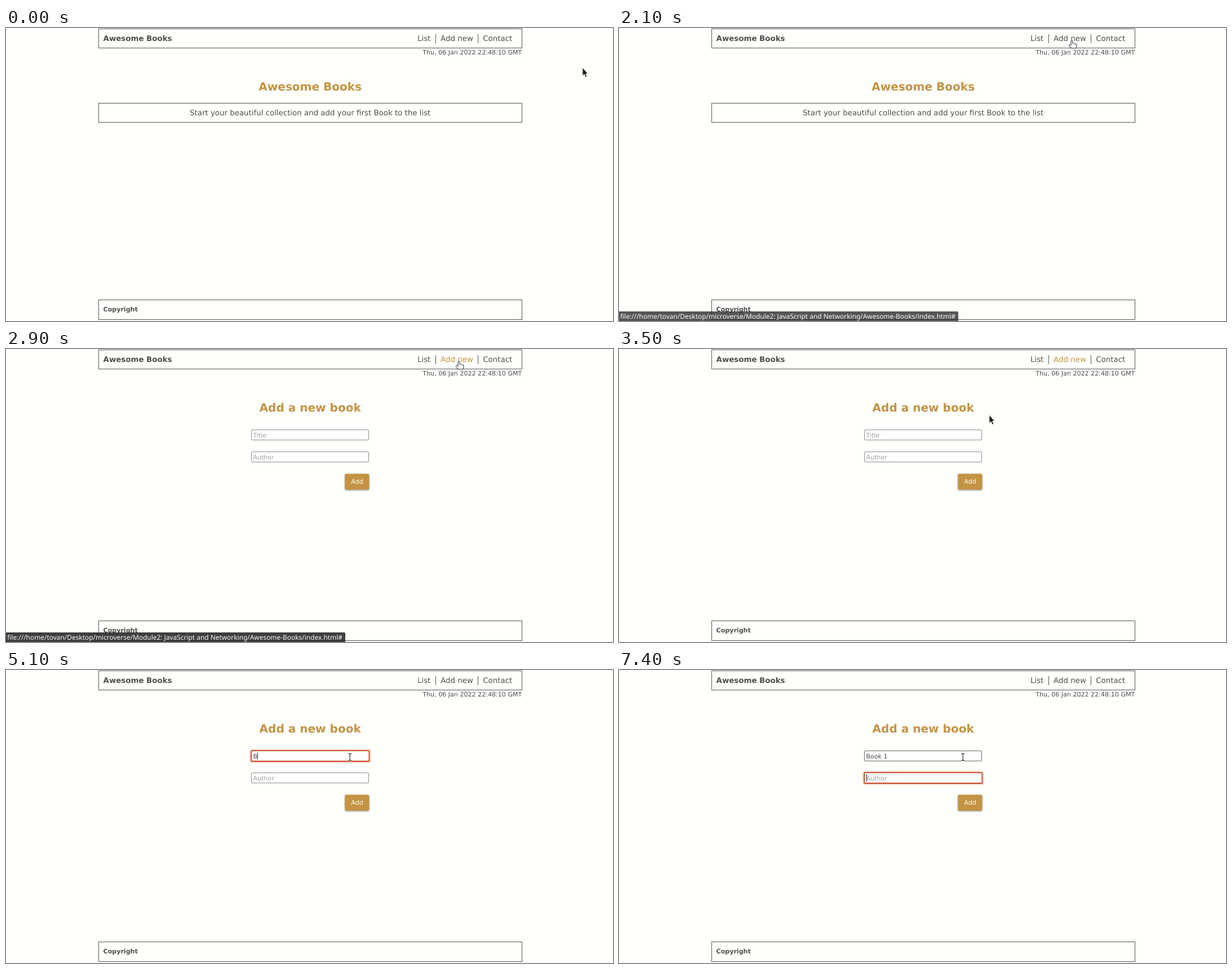
Animation of 1077x520 px, one loop 8 s. Source, as an HTML page:

```html
<!DOCTYPE html>
<html lang="en">
<head>
<meta charset="utf-8">
<title>Awesome Books</title>
<style>
  html, body { margin: 0; width: 100%; height: 100%; overflow: hidden; background: #fffffc; }
  svg { display: block; width: 100%; height: 100%; }
  text { font: 13.36px "DejaVu Sans", sans-serif; fill: #4d4d4d; text-rendering: geometricPrecision; white-space: pre; }
  .bold { font-weight: bold; }
  .small { font-size: 11.09px; }
  .mid { text-anchor: middle; }
  .end { text-anchor: end; }
  .title { font-size: 20.04px; font-weight: bold; fill: #c49343; }
  .hint { fill: #a3a3a3; }
  .frame { fill: none; stroke: #545454; }
  .rule { fill: #545454; }
  .field { fill: #fff; stroke: #8e8e92; }
  .field.hover { stroke: #69696e; }
  .halo { fill: #fbe5dc; stroke: #f7cdbb; }
  .ring { fill: #fff; stroke: #c8411f; stroke-width: 1.8; }
  .button { fill: #c49343; filter: drop-shadow(0 1px 1.5px rgba(0, 0, 0, .5)); }
  .add { fill: #fffdf5; }
  .link.on { fill: #c49343; }
  .url { font: 11.92px "Noto Sans", "Open Sans", sans-serif; fill: #fbfbfe; }
  .caret { fill: #333; }
  .off { display: none; }
</style>
</head>
<body>
<svg viewBox="0 0 1077 520">
  <rect class="frame" x="164.5" y="1.5" width="751" height="34"/>
  <text class="bold" x="172.6" y="23.3">Awesome Books</text>
  <text x="730" y="23.3">List</text>
  <rect class="rule" x="762" y="11" width="1" height="16"/>
  <text class="link" id="link" x="771.1" y="23.3">Add new</text>
  <rect class="rule" x="837" y="11" width="1" height="16"/>
  <text x="846.3" y="23.3">Contact</text>
  <text class="small end" x="915.3" y="46.7">Thu, 06 Jan 2022 22:48:10 GMT</text>

  <g id="list">
    <text class="title mid" x="539.7" y="111.2">Awesome Books</text>
    <rect class="frame" x="164.5" y="133.5" width="751" height="34"/>
    <text class="mid" x="539.7" y="154.7">Start your beautiful collection and add your first Book to the list</text>
  </g>

  <g id="form">
    <text class="title mid" x="539.7" y="111.2">Add a new book</text>
    <rect class="field" id="titleBox" x="435.5" y="143.5" width="208" height="18" rx="1.5"/>
    <rect class="field" x="435.5" y="182.5" width="208" height="18" rx="1.5"/>
    <g id="focus">
      <rect class="halo" x="432.8" y="140.7" width="214.4" height="23.8" rx="3.5"/>
      <rect class="ring" x="435.2" y="143.1" width="209.2" height="18.9" rx="1.6"/>
    </g>
    <text class="small" id="book" x="438.4" y="156.5"></text>
    <text class="small hint" x="438.4" y="195.6">Author</text>
    <rect class="caret" id="caret" y="146" width="1" height="13"/>
    <rect class="button" x="601.5" y="221.4" width="42.7" height="28" rx="2"/>
    <text class="small add mid" x="623" y="239">Add</text>
  </g>

  <rect class="frame" x="164.5" y="482.5" width="751" height="35"/>
  <text class="bold small" x="172.5" y="503.3">Copyright</text>

  <g id="status">
    <path d="M0 503H600Q602 503 602 505V520H0Z" fill="#2b2b2e"/>
    <text class="url" x="2.2" y="516.3">file:///home/tovan/Desktop/microverse/Module2: JavaScript and Networking/Awesome-Books/index.html#</text>
  </g>

  <g id="cursor">
    <path id="arrow" d="M0 -.5V13.8L3.1 11L5.3 16.2L7.7 15.2L5.5 10.1H9.4Z" fill="#1c1c1c" stroke="#fff" stroke-width=".8"
      style="filter:drop-shadow(.5px .8px .6px rgba(0,0,0,.3))"/>
    <path id="hand" d="M-1.4 9V1.6Q-1.4 .3 0 .3T1.4 1.6V5.8Q3.2 4.9 4 6.4Q5.7 5.5 6.5 7Q8.6 6.6 8.6 8.6V11L7.4 14.4H-.6L-5 10Q-5.8 8.4 -4.4 7.9Q-3.4 7.7 -1.4 9Z"
      fill="#fff" stroke="#222" stroke-linejoin="round"/>
    <g id="beam" fill="none">
      <path d="M-3 -6H-1L0 -5L1 -6H3M0 -5V5M-3 6H-1L0 5L1 6H3" stroke="#fff" stroke-width="2.4"/>
      <path d="M-3 -6H-1L0 -5L1 -6H3M0 -5V5M-3 6H-1L0 5L1 6H3" stroke="#222" stroke-width="1.1"/>
    </g>
  </g>
</svg>
<script>
const LOOP = 8000;
const el = id => document.getElementById(id);
const show = (id, on) => el(id).classList.toggle("off", !on);

// Latest row whose time has come
const at = (rows, t) => rows.filter(r => r[0] <= t).pop();

// time, x, y, pointer shape
const pointer = [
  [0, 1023, 71, "arrow"], [1100, 1020, 69, "arrow"], [1200, 997, 58, "arrow"],
  [1300, 949, 39, "arrow"], [1400, 893, 20, "arrow"], [1500, 843, 6, "arrow"],
  [1600, 810, 3, "arrow"], [1700, 800.5, 10.5, "hand"], [1800, 802.5, 17, "hand"],
  [1900, 803, 21, "hand"], [2000, 803.5, 21.5, "hand"],
  [3300, 796, 33, "arrow"], [3400, 735, 76, "arrow"], [3500, 657, 117.8, "arrow"],
  [3600, 625, 142, "arrow"], [3700, 614, 151, "beam"], [3800, 611, 153.5, "beam"],
  [3900, 610.2, 154.5, "beam"]
];

const bar = [[0, 0], [2000, .35], [2100, .8], [2200, 1], [2900, .91], [3000, 0]];

// time, typed text, caret x (0 = hidden)
const typing = [
  [0, "", 0], [4200, "", 439], [5100, "B", 446], [5400, "B", 0], [5600, "Boo", 459],
  [6000, "Book", 466], [6300, "Book ", 469], [6600, "Book 1", 0], [7400, "Book 1", 439]
];

function draw(t) {
  const [, x, y, shape] = at(pointer, t);
  el("cursor").setAttribute("transform", `translate(${x} ${y})`);
  for (const id of ["arrow", "hand", "beam"]) show(id, id === shape);

  const added = t >= 2800, focused = t >= 4200, second = t >= 7400;
  show("list", !added);
  show("form", added);
  el("link").classList.toggle("on", added && !focused);
  el("titleBox").classList.toggle("hover", t >= 3700);
  el("status").style.opacity = at(bar, t)[1];

  const drop = second ? 39 : 0;
  show("focus", focused);
  el("focus").setAttribute("transform", `translate(0 ${drop})`);

  const [, text, caretX] = at(typing, t);
  el("book").textContent = text || "Title";
  el("book").classList.toggle("hint", !text);
  show("caret", caretX);
  el("caret").setAttribute("x", caretX);
  el("caret").setAttribute("y", 146 + drop);
}

const start = performance.now();
function tick() {
  draw((performance.now() - start) % LOOP);
  requestAnimationFrame(tick);
}
tick();
</script>
</body>
</html>
```
